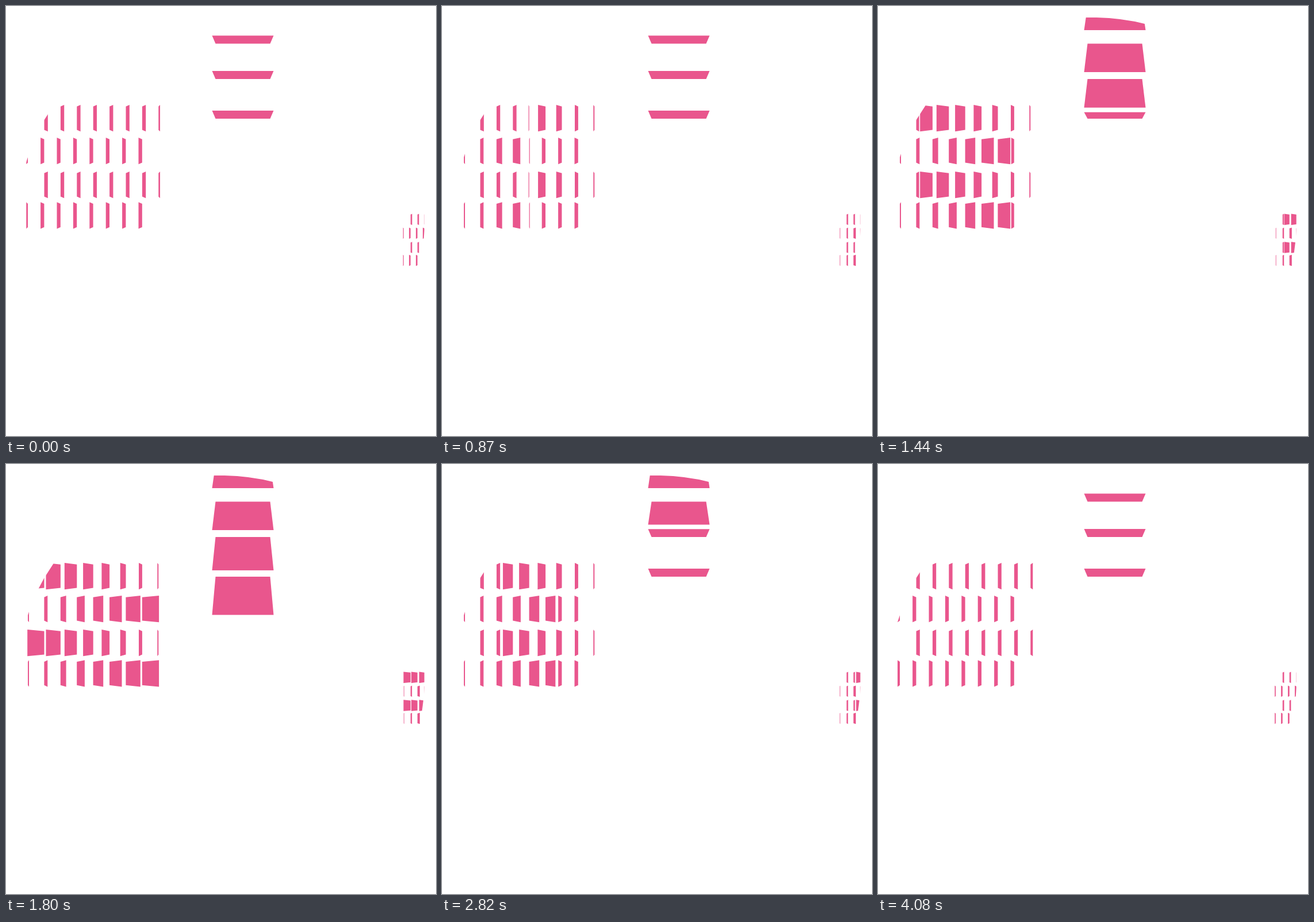
An HTML page with a canvas for the animation above (4.35 s loop, 748x748 px).

```html
<!DOCTYPE html>
<html lang="en">
<head>
<meta charset="utf-8">
<title>Light on louvres</title>
<style>
html, body { margin: 0; width: 100%; height: 100%; overflow: hidden; background: #fff; }
canvas { display: block; width: 748px; height: 748px; }
</style>
</head>
<body>
<canvas id="stage" width="748" height="748"></canvas>
<script>
const ctx = document.getElementById('stage').getContext('2d');
const LOOP = 4350, STEP = 30, STAGGER = 207;
const MIRROR = 303.3, PITCH = 28.4;

// The lit parts only show inside the silhouettes of the three buildings.
const outline = new Path2D(
  'M34 275 L40 257 Q49 233 57 216 L66 199 L83 172.5 L90 162 H290 V400 H20 V275 Z ' +
  'M350 20 H380 Q425 21 464 31 L470 33 V280 H350 Z ' +
  'M680 350 H728 V390 L726 411 L720.5 455 H680 Z');

const clamp = v => Math.min(1, Math.max(0, v));
const dayLeft = age => 1 - clamp(age / 72) ** 1.3;
const duskShown = age => 1 - (1 - clamp((age - 64) / 320)) ** 2.7;

// A face reaches from the ridge towards its far edge; place() turns (along, across) into x, y.
function drawFace(ridge, reach, lo, hi, inset, place) {
  if (!reach) return;
  const edge = ridge + reach;
  ctx.beginPath();
  for (const [along, across] of
    [[ridge, lo + inset], [edge, lo], [edge, hi], [ridge, hi - inset]])
    ctx.lineTo(...place(along, across));
  ctx.fill();
}

// Each slat folds at a ridge: a day face before it, a dusk face after it.
function drawSlat(turn, sweep, ridge, day, dusk, ...shape) {
  const age = sweep - turn * STAGGER;
  drawFace(ridge, -day * dayLeft(age), ...shape);
  drawFace(ridge, dusk * duskShown(age), ...shape);
}

// Four rows of eight slats, every other row mirrored.
function drawGrid(sweep) {
  [172, 229, 288, 341.3].forEach((top, row) => {
    const place = row % 2 ? (x, y) => [x, y] : (x, y) => [MIRROR - x, y];
    for (let k = 0; k < 8; k++)
      drawSlat(k, sweep, 38 + PITCH * k, Math.min(6.3, 4 + 2.5 * k), 2 + 3.9 * k,
        top, top + 46.3, 2.8, place);
  });
}

function drawTower(sweep) {
  [1, 65.5, 127, 196].forEach((ridge, i) =>
    drawSlat(i + 4, sweep, ridge, 14, 41 + 8.5 * i, 358.5, 465.5, 6, (y, x) => [x, y]));
}

function draw(now) {
  const t = Math.floor(now % LOOP / STEP) * STEP;
  const sweep = t < 2250 ? t + STEP : 4065 - t;   // out, hold, back
  ctx.clearRect(0, 0, 748, 748);
  ctx.save();
  ctx.clip(outline);
  ctx.fillStyle = '#e9568d';
  drawGrid(sweep);
  drawTower(sweep);
  ctx.translate(675.8, 289.1);   // the far building is a small copy
  ctx.scale(0.421, 0.421);
  drawGrid(sweep);
  ctx.restore();
}

const begin = performance.now();
function tick() {
  draw(performance.now() - begin);
  requestAnimationFrame(tick);
}
tick();
</script>
</body>
</html>
```
